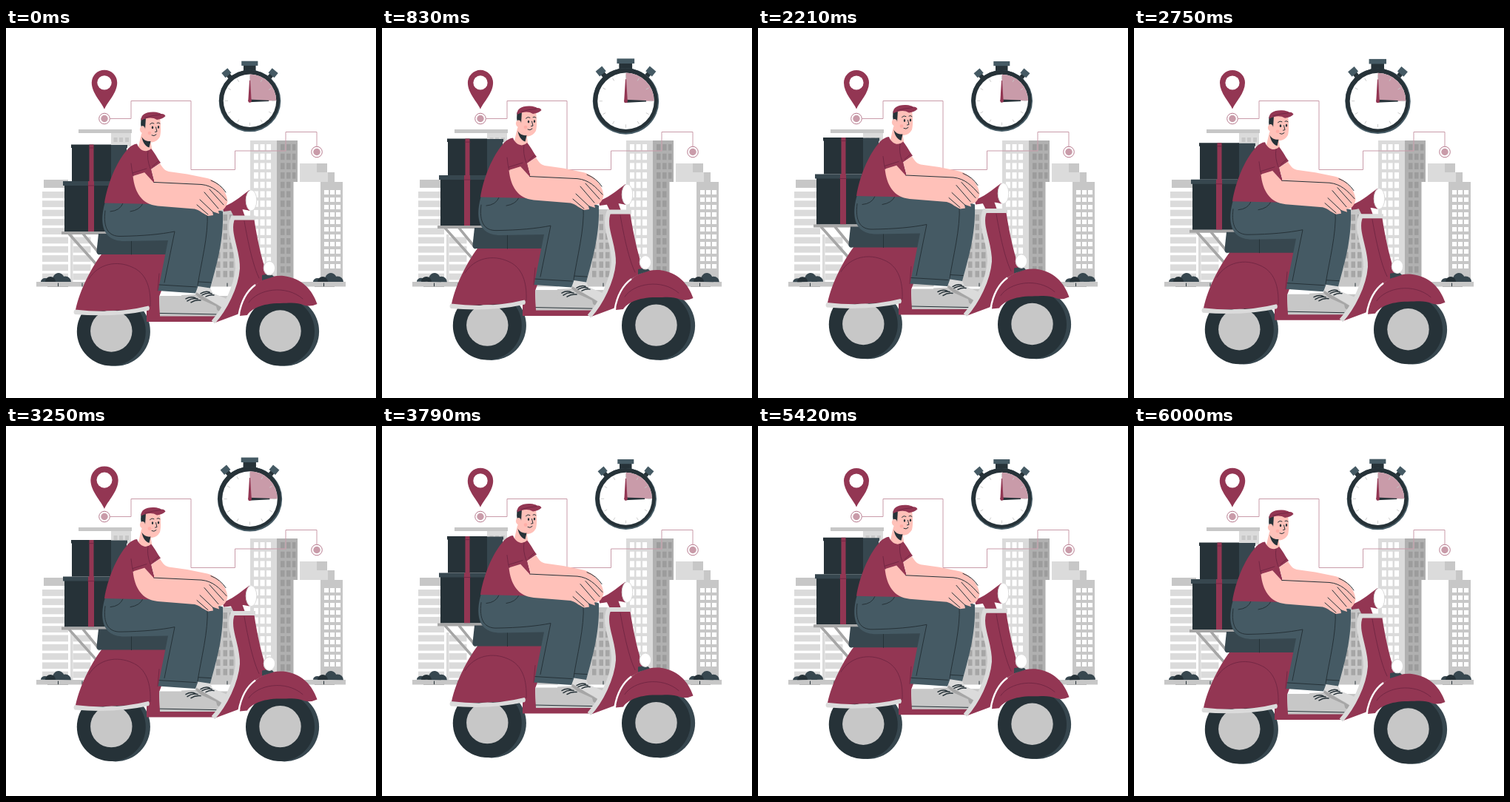
These frames come from a looping animation (500 by 500 pixels, 6.04 s). An HTML page:

```html
<!DOCTYPE html>
<html lang="en">
<head>
<meta charset="utf-8">
<title>Scooter delivery</title>
<style>
  html, body { margin: 0; width: 100%; height: 100%; overflow: hidden; background: #fff; }
  svg { display: block; width: 100vw; height: 100vh; }
  .red { fill: #933653; }
  .ink { fill: #263238; }
  .deep { fill: #37474f; }
  .slate { fill: #455a64; }
  .skin { fill: #ffc1b9; }
  .g1 { fill: #dbdbdb; }
  .g2 { fill: #c7c7c7; }
  .g3 { fill: #a6a6a6; }
  .side { fill: #b0b0b0; }
  .pane { fill: #9c9c9c; }
  .white { fill: #fff; }
  .pink { fill: #c99ba9; }
  .line { fill: none; stroke: #263238; stroke-width: 1; stroke-linecap: round; stroke-linejoin: round; }
  .bold { stroke-width: 1.5; }
  .seam { fill: none; stroke: #6b2440; stroke-width: .8; stroke-linecap: round; }
  .route { fill: none; stroke: #c99ba9; stroke-width: 1; }
</style>
</head>
<body>
<svg viewBox="0 0 500 500">
  <g id="city">
    <path class="g2" d="M51 205H84V216H51ZM98 137H170V142H98Z"/>
    <path class="g1" d="M142 142H169V160H142Z"/>
    <path class="g2" d="M145.500 148h5v6h-5zM153 148h5v6h-5zM161 148h5v6h-5z"/>
    <path class="g1" d="M87 279H90.500V343H87Z"/>
    <path class="g2" d="M276 245H313V343H276Z"/>
    <path class="g1" d="M330 152H366V343H330ZM397 183H420V208H397ZM420 195H435V208H420Z"/>
    <path class="side" d="M366 152H394V208H388.500V343H366Z"/>
    <path class="g2" d="M420 183H434V195H420ZM435 195H444V208H435ZM425 208H455V343H425Z"/>
  </g>
  <path class="g2" d="M41 343H459V349.500H41Z"/>
  <path class="line" d="M70.500 345v4M103 345v4M299 345v4M429.500 345v4"/>
  <path fill="none" stroke="#a6a6a6" stroke-width=".7" d="M56 349.500H84M417 349.500H444"/>
  <g id="bushL"></g>
  <g id="bushR"></g>

  <path class="route" d="M140.500 122.500H169V98.500H250V191.500H309.500V166H378V140.500H420V160"/>
  <g id="stops"></g>
  <g id="pin">
    <path class="red" d="M133 109.500C129 100 116 88 116 74A17 17 0 0 1 150 74C150 88 137 100 133 109.500Z"/>
    <circle class="white" cx="133" cy="74" r="9.600"/>
  </g>

  <g id="watch">
    <path class="ink" d="M321 50H337.500V59H321Z"/>
    <rect class="slate" x="318.300" y="45" width="22" height="6.200"/>
    <g id="knobs"></g>
    <circle class="slate" cx="329.500" cy="98.500" r="41.500"/>
    <circle class="ink" cx="329" cy="97.500" r="40.600"/>
    <circle class="white" cx="329.500" cy="98.300" r="35.500"/>
    <path class="pink" d="M329.500 98.300V62.800A35.500 35.500 0 0 1 365 98.300Z"/>
    <g id="ticks" stroke="#c7c7c7" stroke-width=".8"></g>
    <path class="ink" d="M328 96.500L355 97.600V99L328 100.300Z"/>
    <path class="red" d="M327.300 99L329 71H330L331.700 99Z"/>
    <circle class="red" cx="329.500" cy="98.500" r="2.200"/>
  </g>

  <g id="ride">
    <g id="wheels"></g>

    <!-- parcels and rack -->
    <path class="deep" d="M140 158H164V162H163V207H140Z"/>
    <path class="ink" d="M88 157.500H142V207H89V162H88ZM79 212H145V275H79Z"/>
    <path class="deep" d="M77 207H147V213H77Z"/>
    <path class="red" d="M112.500 157.500H118.500V207H112.500ZM111 207H119V275H111Z"/>
    <path class="seam" d="M112 162H119M110.500 213H119.500"/>
    <path fill="none" stroke="#a6a6a6" stroke-width="3.600" d="M85 278L128 326M104 278L127 306"/>
    <path class="g3" d="M75 275H136V279H75Z"/>

    <!-- seat and rear body -->
    <path class="red" d="M93.500 384C97 362 112 328 130 304.500H219L210 355L207 363L208 386L286 389L291 393L280 397H190V380Z"/>
    <path class="deep" d="M125 278H220L219 306H126Q122 306 122.500 301Z"/>
    <path class="line" d="M169.500 284V306"/>
    <path class="seam" d="M112 339C125 318 150 314 170 323C190 331 196 352 195 376M207 332L205 355"/>
    <path class="g1" d="M93 380.500Q147 387 192.500 375.500Q195 378 193 381.500Q148 391.500 93 387Q90 384 93 380.500Z"/>

    <!-- floor -->
    <path class="g2" d="M207 362H300L288 389.500H208Z"/>
    <path class="line" d="M208 385.500L284 387"/>

    <!-- shoes -->
    <path class="g1" d="M258 349H275L279 358L298 366L297 381L285 373L262 362L256 356Z"/>
    <path class="g3" d="M257 357L297 381L293 385L254 366Z"/>
    <path class="white" d="M238 355H256L255 362H237Z"/>
    <path class="g2" d="M237 361L256 360L264 367L284 376L286 384H238Z"/>
    <path class="line bold" d="M243 366Q250 362 256 365M245 369Q252 364 259 366M250 371Q256 367 263 368M263 359Q269 355 275 357M265 361Q272 357 278 359M270 363Q276 360 281 361"/>

    <!-- shield, handlebar, fender -->
    <path class="red" d="M306 256H335C340 290 347 318 354 337L335 348L318 385L283 398C300 378 313 350 313 322C313 300 299 280 306 256Z"/>
    <path class="seam" d="M322 261C327 290 334 322 342 338"/>
    <path class="red" d="M302 243L318 241L323 255H308Z"/>
    <path fill="none" stroke="#dbdbdb" stroke-width="6" d="M337 256.500H306.500C298 276 314 300 313 325C311 350 296 380 280 397.500"/>
    <path class="red" d="M293 242C312 234 320 225 329 219V247C318 243 306 247 294 248Z"/>
    <ellipse class="white" cx="331.500" cy="233" rx="7.300" ry="14" stroke="#dbdbdb" stroke-width="1"/>
    <path class="red" d="M316 389C320 355 345 333 375 335C400 338 414 354 420.500 373Q412 377 404 375C392 370 384 372 370 372C345 372 331 380 326 388Z"/>
    <path fill="none" stroke="#fff" stroke-width="2.400" d="M314.500 388C318 368 326 355 337 347"/>
    <path class="seam" d="M328 371C340 353 378 346 401 366"/>
    <path class="deep" d="M346 334L358 332L362 336L346 341Z"/>
    <ellipse class="white" cx="356" cy="324.500" rx="7.700" ry="9.300" stroke="#dbdbdb" stroke-width="1.200"/>

    <!-- trousers -->
    <path class="slate" d="M134 235C128 255 125 288 160 288L219 287L205.500 355L256 358.500L259.500 349L276 351.500C287 312 294 285 293 248L270 240L200 235Z"/>
    <path class="line" d="M134 247C131 270 138 282 155 281.500C185 281 208 279 228 275L214 344M272 250C274 280 263 320 259 348M207 347L257 350M260 343L277 344M185 237Q181 246 168 248M158 237Q154 247 141 248"/>

    <!-- torso -->
    <path class="skin" d="M183 143L195 150L198 169H177Z"/>
    <path class="red" d="M177 156.500C180 165 189 170 196 163C202 170 205 177 209 182L196 191L201 209V238L133 236.500C137 212 148 182 165 163Q171 157 177 156.500Z"/>
    <path class="skin" d="M171.500 200L191 194L200 209V205L196 191L208 183C212 189 214 192.500 220 194L245 197.500L272 203C286 207 298 219 299.500 234C298 243 293 247 287 247L288 251L279 248L280 253L273 254C265 250 261 246 255 244.500L205 240.500C183 238 174 222 171.500 200Z"/>
    <path class="red" d="M187 195L196 190.500L200.300 209.500Z"/>
    <path class="line" d="M200 208.500L264 211.500C280 213 289 223 298 233M277 206Q290 211 297 222M268 222L287 244M262 232L280 249M275 218L294 239M258 239L273 252"/>
    <path class="seam" d="M169 183Q170 194 172 200M171 196L190 190M198 187L206 180M192 166Q190 177 195 190"/>

    <!-- head -->
    <path class="ink" d="M182.500 122H191V137H183Q181.500 130 182.500 122Z"/>
    <path class="skin" d="M189 121H208C209 130 210 139 208 147Q204 154 197 154.500Q187 153 183 146L184 137H188Z"/>
    <path class="ink" d="M183.500 147C186 152 191 153.500 195.500 153L193.500 161.500C188 160 184.500 154 183.500 147Z"/>
    <ellipse class="skin" cx="184.500" cy="137" rx="3.600" ry="4.600"/>
    <path class="red" d="M182.500 125C182 117 189 113 200 113.500Q207 114 209.500 116Q214 115.500 215.500 119Q212 123 204 124C198 120 190 121 182.500 125Z"/>
    <path class="seam" d="M188 121Q198 118 209 117"/>
    <ellipse class="ink" cx="198" cy="134.500" rx="1.200" ry="1.900"/>
    <ellipse class="ink" cx="206" cy="134" rx="1.200" ry="1.900"/>
    <path class="line" d="M194.500 130Q197 127 200 129M204 128.500Q206 127 208 129M202.500 134L204 140L201.500 140.500M197 145Q200 147 203 144"/>
    <circle cx="194" cy="142" r="2.300" fill="#ff9c96" opacity=".5"/>
  </g>
</svg>

<script>
const $ = id => document.getElementById(id);

function add(parent, tag, cls, attrs) {
  const el = document.createElementNS('http://www.w3.org/2000/svg', tag);
  if (cls) el.setAttribute('class', cls);
  for (const k in attrs) el.setAttribute(k, attrs[k]);
  parent.append(el);
  return el;
}

const rect = (p, cls, x, y, width, height) => add(p, 'rect', cls, { x, y, width, height });
const disc = (p, cls, cx, cy, r) => add(p, 'circle', cls, { cx, cy, r });

function windows(cls, xs, y, w, h, pitch, rows) {
  for (let i = 0; i < rows; i++)
    for (const x of xs) rect($('city'), cls, x, y + i * pitch, w, h);
}

windows('g1', [49], 221, 35, 8.8, 12.3, 10);
windows('g1', [90.5], 282.5, 24, 8.8, 12.3, 5);
windows('white', [335, 343.5, 352], 157, 6, 8.5, 12.7, 14);
windows('pane', [371, 379], 157, 5.5, 8.5, 12.7, 14);
windows('pane', [387], 157, 4.5, 8.5, 12.7, 4);
windows('g3', [284, 293.5, 302], 252, 5.5, 8.5, 12.7, 7);
windows('white', [430, 438, 446], 219, 6, 6, 10, 11);

function bush(g, x) {
  for (const [dx, w, h, cls] of [[6, 6, 5, 'deep'], [33, 8, 7.5, 'deep'], [24, 9, 12, 'deep'], [13, 7, 7, 'ink']])
    add(g, 'path', cls, { d: `M${x + dx - w} 343a${w} ${h} 0 0 1 ${2 * w} 0Z` });
}
bush($('bushL'), 47);
bush($('bushR'), 415);

for (const [x, y] of [[133, 122.5], [420, 167.5]]) {
  add($('stops'), 'circle', 'white', { cx: x, cy: y, r: 7.3, stroke: '#b77a8e', 'stroke-width': 1 });
  disc($('stops'), 'pink', x, y, 4.7);
}

for (const a of [-40, 40]) {
  const g = add($('knobs'), 'g', '', { transform: `rotate(${a} 329.5 98.3)` });
  rect(g, 'ink', 326.5, 52, 6, 8);
  rect(g, 'slate', 324.3, 45.5, 10.4, 8);
}

for (let a = 0; a < 360; a += 30)
  add($('ticks'), 'path', '', { d: 'M329.5 65V69', transform: `rotate(${a} 329.5 98.3)` });

for (const x of [142.3, 370.5]) {
  disc($('wheels'), 'deep', x + 5.8, 410, 46.8);
  disc($('wheels'), 'ink', x, 410, 46.5);
  disc($('wheels'), 'g2', x, 409.5, 28.2);
}

// Steps: [fraction of the period, value]
const FLOAT = [[0, .5], [.5, -9.5], [1, .5]];
const BEAT = [[0, 1], [.1, 1.1], [.3, 1], [.4, 1], [.5, 1.1], [.6, 1], [1, 1]];
const SWAY = [[0, 0], [.25, 1], [.75, -1], [1, 0]];
const LOOP = 6040;
const LEAD = 40; // the loop opens slightly into the motion

function at(steps, t, period) {
  const p = (t % period) / period;
  const i = steps.findIndex(s => s[0] > p);
  const [p0, v0] = steps[i - 1], [p1, v1] = steps[i];
  return v0 + (v1 - v0) * (p - p0) / (p1 - p0);
}

const move = (id, value) => $(id).setAttribute('transform', value);
const scale = (id, s, x, y) => move(id, `translate(${x} ${y}) scale(${s}) translate(${-x} ${-y})`);

function draw(now) {
  const t = now % LOOP + LEAD;
  move('ride', `translate(0 ${at(FLOAT, t, 1500)})`);
  scale('watch', at(BEAT, t, 6000), 329.5, 92.4);
  scale('pin', at(BEAT, t, 3000), 133, 83.3);
  const sway = at(SWAY, t, 3000);
  move('bushL', `rotate(${sway} 67.5 337)`);
  move('bushR', `rotate(${sway} 434.5 337)`);
}

const start = performance.now();
function frame() {
  draw(performance.now() - start);
  requestAnimationFrame(frame);
}
frame();
</script>
</body>
</html>
```
